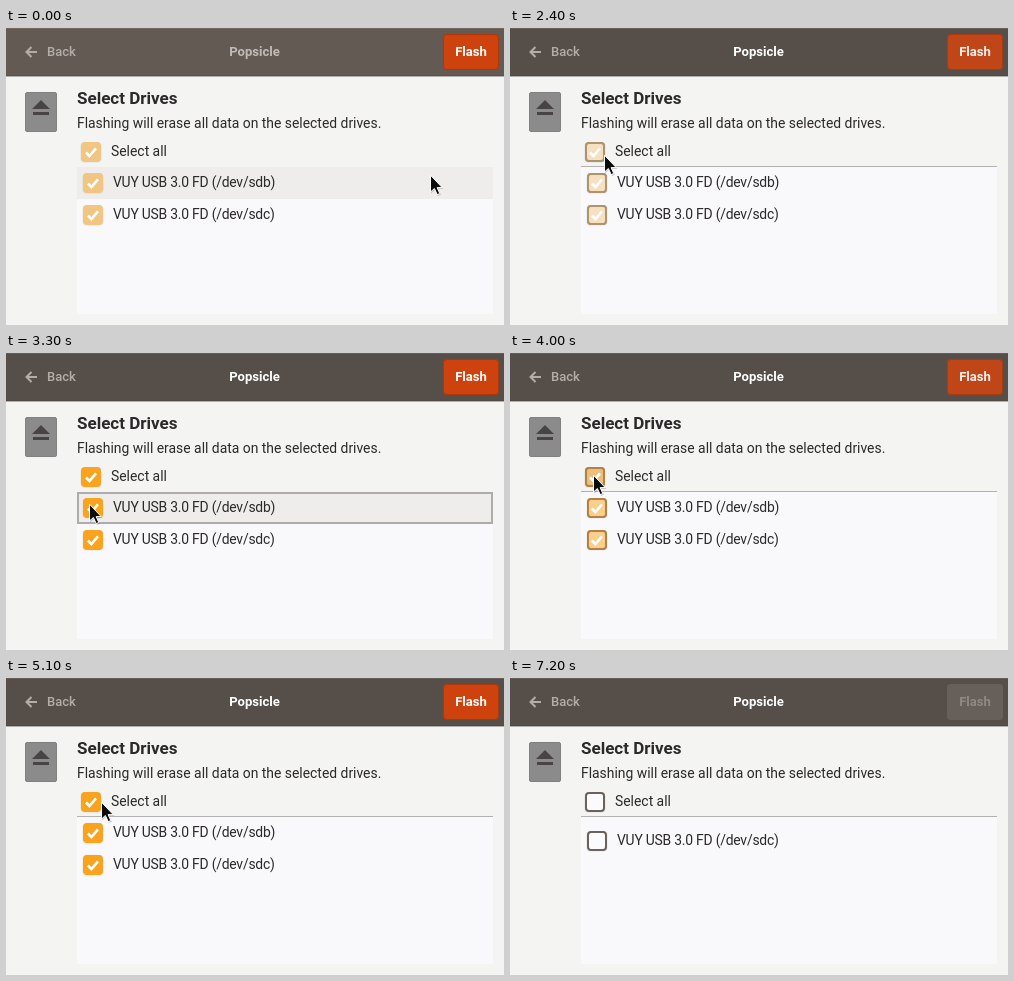
Recreate the animation shown at these times as an HTML page. Size 498 by 297 pixels, loop 8 s.

```html
<!DOCTYPE html>
<html lang="en">
<head>
<meta charset="utf-8">
<title>Select Drives</title>
<style>
  html, body { margin: 0; width: 100%; height: 100%; overflow: hidden; background: #f4f4f2; }
  svg { display: block; width: 498px; height: 297px; }
  text { font: 13.9px Roboto, "Noto Sans", sans-serif; fill: #2b2929; }
  .drive { letter-spacing: -.22px; }
  .head { font-size: 17px; font-weight: 700; }
  .bar { font-size: 13.1px; font-weight: 700; }
  #back { fill: #b3ada8; }
  #back text { font-size: 13px; font-weight: 500; fill: inherit; }
</style>
</head>
<body>
<svg viewBox="0 0 498 297">
  <rect width="498" height="297" fill="#f4f4f2"/>
  <rect id="header" width="498" height="48"/>
  <rect width="498" height="1" fill="#fff" opacity=".08"/>
  <rect y="47" width="498" height="1" opacity=".08"/>
  <rect y="48" width="498" height="1" opacity=".28"/>
  <g id="back">
    <path d="M31 24 H21 M25.5 19 L20.5 24 L25.5 29" fill="none" stroke="#b3ada8" stroke-width="2"/>
    <text x="41" y="28">Back</text>
  </g>
  <text id="title" class="bar" x="248.5" y="28" text-anchor="middle">Popsicle</text>
  <rect id="flash" x="437" y="6" width="56" height="36" rx="4"/>
  <rect id="flashRim" x="437.5" y="6.5" width="55" height="35" rx="3.5" fill="none" stroke="#000" stroke-opacity=".16"/>
  <text id="flashText" class="bar" x="465" y="28" text-anchor="middle">Flash</text>

  <rect x="19.5" y="64.5" width="31" height="39" rx="1.5" fill="#8c8b8b" stroke="#828181"/>
  <path d="M35 72 L44 81 H26 Z M27 84 H43 V87 H27 Z" fill="#484444"/>

  <text class="head" x="71" y="76">Select Drives</text>
  <text x="71" y="100">Flashing will erase all data on the selected drives.</text>
  <g id="rowAll"><text x="105" y="128">Select all</text></g>

  <rect x="71" y="139" width="416" height="147" fill="#f9f8fb"/>
  <rect id="rule" x="71" y="138" width="416" height="1" fill="#b3b2b1"/>
  <rect id="hover" x="71" y="139" width="416" height="32" fill="#eeedeb"/>
  <rect id="focus" x="72" y="140" width="414" height="30" fill="none" stroke="#afadab" stroke-width="2"/>
  <g id="rowB"><text class="drive" x="107" y="159">VUY USB 3.0 FD (/dev/sdb)</text></g>
  <g id="rowC"><text class="drive" x="107" y="191">VUY USB 3.0 FD (/dev/sdc)</text></g>

  <g id="cursor">
    <path d="M1 1 V18.5 L5.2 15 L8 21 L11 19.7 L8.3 13.9 H13.4 Z" opacity=".18"/>
    <path d="M.5 .2 V17 L4.4 13.5 L7.2 19.6 L9.8 18.5 L7.1 12.6 H12.2 Z" fill="#0b0b0b" stroke="#fff"/>
  </g>
</svg>
<script>
const LOOP = 8000, STEP = 100, FADE = 300, HOVER_LAG = 30;
const WAKE = 2300, UNPLUG = 6900, LEAVE = 5000, GONE = 5800;
const $ = id => document.getElementById(id);

const spots = { rest: [424, 147], near: [98, 127], label: [94, 127], all: [83, 122], row: [83, 151], exit: [368, 178] };

// Pointer moves: start, end, destination, optional sideways wave.
const moves = [
  [1215, 1800, "all", 33],
  [1800, 2100, "near"],
  [2200, 2400, "label"],
  [3000, 3300, "row"],
  [3800, 3900, "all"],
  [4100, 4200, "row"],
  [4400, 4500, "all"],
  [LEAVE, GONE, "exit"]
];

// Selection changes: time, where it was made, boxes checked afterwards.
const changes = [
  [2250, "all", ""],
  [2950, "all", "all b c"],
  [3300, "row", "c"],
  [3600, "row", "all b c"],
  [3850, "all", ""],
  [4250, "row", "b"],
  [4650, "all", "all b c"],
  [6850, "unplug", ""]
];

const clamp = v => Math.min(1, Math.max(0, v));
const ramp = (t, start, length) => clamp((t - start) / length);
const smooth = p => p * p * (3 - 2 * p);
const lerp = (a, b, p) => a + (b - a) * p;

function mix(from, to, p) {
  const rgb = hex => [1, 3, 5].map(i => parseInt(hex.slice(i, i + 2), 16));
  const end = rgb(to);
  return `rgb(${rgb(from).map((v, i) => Math.round(lerp(v, end[i], p)))})`;
}

function pointer(t) {
  return moves.reduce(([x, y], [start, end, spot, wave = 0]) => {
    const p = smooth(ramp(t, start, end - start));
    const [toX, toY] = spots[spot];
    return [lerp(x, toX, p), lerp(y, toY, p) - wave * Math.sin(2 * Math.PI * p)];
  }, spots.rest);
}

const level = (name, t) => changes.reduce((v, [start, , checked]) =>
  lerp(v, checked.split(" ").includes(name) ? 1 : 0, ramp(t, start, FADE)), 1);

function set(el, attrs) {
  for (const key in attrs) el.setAttribute(key, attrs[key]);
  return el;
}

function add(parent, tag, attrs) {
  return parent.appendChild(set(document.createElementNS("http://www.w3.org/2000/svg", tag), attrs));
}

function checkbox(parent, x, y) {
  const g = add(parent, "g", { transform: `translate(${x} ${y})` });
  add(g, "rect", { x: -11, y: -10, width: 22, height: 21, rx: 4.5, opacity: .04 });
  const off = add(g, "rect", { x: -9, y: -9, width: 18, height: 18, rx: 3, stroke: "#69625e", "stroke-width": 2 });
  const on = add(g, "rect", { x: -10, y: -10, width: 20, height: 20, rx: 4 });
  const tick = add(g, "path", { d: "M-5 .5 L-1.6 4 L5 -3.6", fill: "none", stroke: "#fff", "stroke-width": 2.6 });
  return (value, color, tint) => {
    set(off, { fill: tint ? "#dcdbd8" : "#fbfafc", opacity: value < 1 ? 1 : 0 });
    set(on, { fill: color, opacity: value });
    set(tick, { opacity: clamp(2 * value) });
  };
}

const boxes = {
  all: checkbox($("rowAll"), 85, 124),
  b: checkbox($("rowB"), 87, 155),
  c: checkbox($("rowC"), 87, 187)
};

function draw(t) {
  const active = ramp(t, WAKE - STEP, 2 * STEP);
  const [x, y] = pointer(t);
  const last = changes.filter(([start]) => start <= t).pop();
  const focused = last && last[1] === "row";
  const present = t < LEAVE;
  const hover = t < WAKE ? 1 : present ? clamp((pointer(t - HOVER_LAG)[1] - 127) / 12) : 0;

  set($("header"), { fill: mix("#645a54", "#564e49", active) });
  $("title").style.fill = mix("#c0bbb7", "#ffffff", active);
  set($("rule"), { opacity: focused ? 0 : active });
  set($("hover"), { opacity: hover });
  set($("focus"), { opacity: focused ? 1 : 0 });

  const color = mix("#f1c582", "#f9a31f", ramp(t, WAKE + 400, FADE));
  const overAll = present && t > WAKE && y < 139 && x < 90;
  let most = 0;
  for (const name in boxes) {
    const value = level(name, t);
    boxes[name](value, color, name === "all" && overAll);
    most = Math.max(most, value);
  }

  const flash = 1 - (1 - most) ** 3;
  set($("flash"), { fill: mix("#665f5a", "#ce420d", flash) });
  set($("flashRim"), { opacity: flash });
  $("flashText").style.fill = mix("#8f8985", "#ffffff", flash);

  const single = t >= UNPLUG;
  set($("rowB"), { visibility: single ? "hidden" : "visible" });
  set($("rowC"), { transform: `translate(0 ${single ? -24 : 0})` });
  set($("cursor"), {
    transform: `translate(${Math.round(x)} ${Math.round(y)})`,
    visibility: t < GONE ? "visible" : "hidden"
  });
}

const start = performance.now();
function frame() {
  const t = (performance.now() - start) % LOOP;
  draw(Math.floor(t / STEP) * STEP);
  requestAnimationFrame(frame);
}
frame();
</script>
</body>
</html>
```
